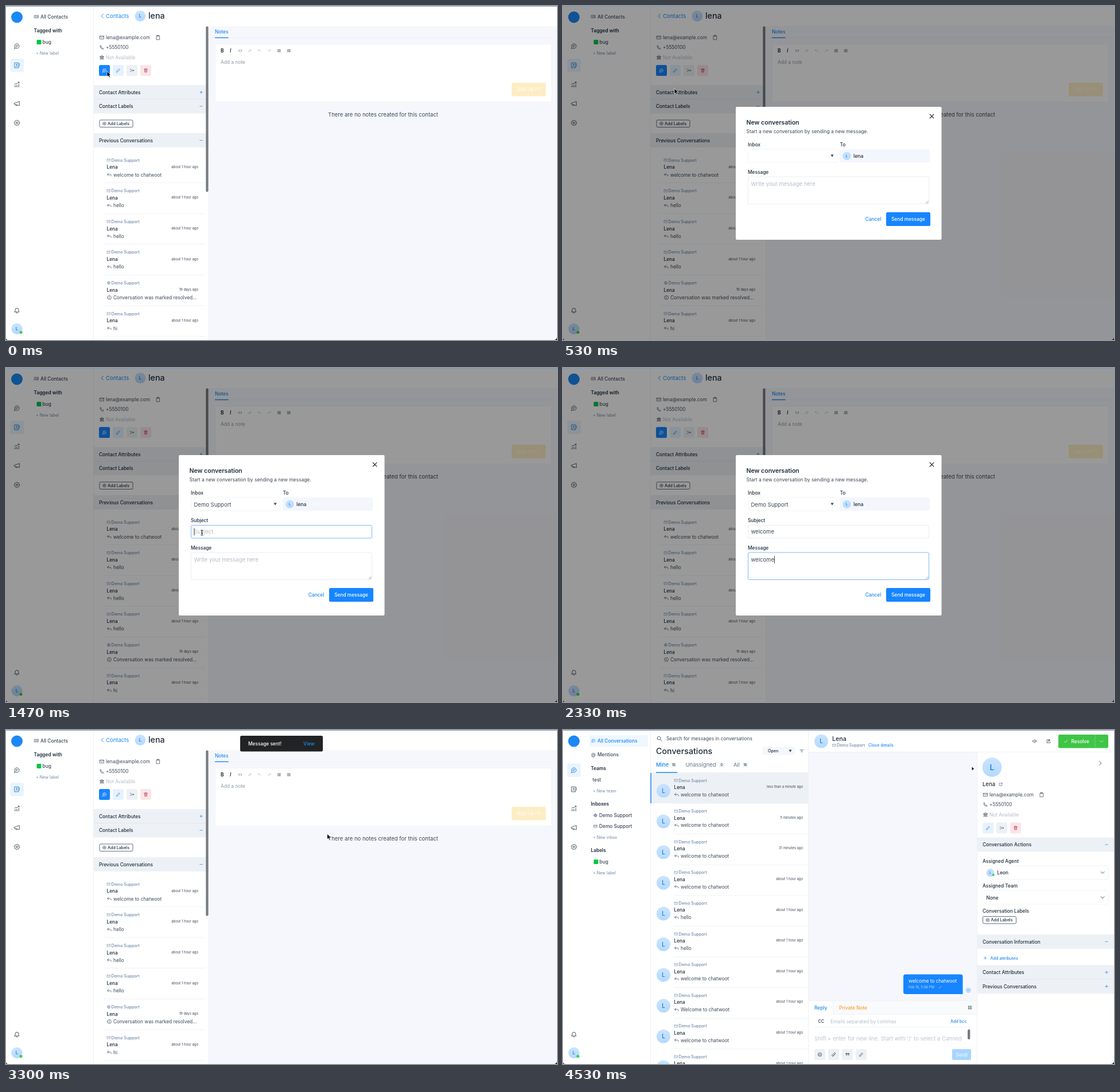
Animation, 960 px wide and 583 px high, one loop 4.86 s. Source, as an HTML page:

```html
<!DOCTYPE html>
<html lang="en">
<head>
<meta charset="utf-8">
<title>New conversation</title>
<style>
html, body { margin: 0; width: 100%; height: 100%; overflow: hidden; background: #fff; }
svg { display: block; width: 100vw; height: 100vh; font-family: Inter, "DejaVu Sans", sans-serif; }
text { white-space: pre; }
</style>
</head>
<body>
<svg id="stage" viewBox="0 0 960 583"></svg>
<script>
const LOOP = 4860;
const BLUE = '#1a88f5', FILL = '#1785ff', DARK = '#1f2d3d', BODY = '#3c4858', MUTED = '#6f88a8', PALE = '#b4bec9';
const PANE = '#f6f7fc', HEAD = '#edf1f5', LINE = '#eef1f5', GREEN = '#06c549';
const XS = 5.94, S = 7.13, M = 8.32, L = 9.5, XL = 14.26;
const NAME = 'Lena', INBOX = 'Demo Support', AGENT = 'Leon', MAIL = 'lena@example.com', PHONE = '+5550100';
const WELCOME = 'welcome to chatwoot';

const ring = r => `M${12 - r} 12a${r} ${r} 0 1 0 ${2 * r} 0a${r} ${r} 0 1 0 ${-2 * r} 0`;
const gear = 'M' + Array.from({ length: 32 }, (_, i) => {
  const a = i * Math.PI / 16, r = i % 4 < 2 ? 10 : 7.6;
  return (12 + r * Math.cos(a)).toFixed(1) + ' ' + (12 + r * Math.sin(a)).toFixed(1);
}).join('L') + 'z';
const icons = {
  chat: 'M3 21l1.5-5a8.5 8.5 0 1 1 3.5 3.5zM8 10h8M8 14h5',
  book: 'M4 3h14v18H4zM21 6v3M21 12v3M7.5 16q3.5-4 7 0M9 9.5a2 2 0 1 0 4 0a2 2 0 1 0-4 0',
  chart: 'M3 12l5-5 4 3 8-7M16 3h4v4M4 17v4M9 14v7M14 16v5M19 11v10',
  horn: 'M3 10l18-6v15L3 14zM7 15.5a3 3 0 0 0 6 2',
  gear: gear + ring(3),
  bell: 'M4 17h16l-2-3v-4a6 6 0 0 0-12 0v4zM10 20.5h4',
  mail: 'M3 5h18v14H3zM3 7l9 6 9-6',
  phone: 'M6 3l3 1 1 4-2 2q2 4 5 6l2-2 4 2v4q-3 2-8-2Q3 12 4 5z',
  bank: 'M3 9l9-6 9 6zM6 9v9M10 9v9M14 9v9M18 9v9M3 20h18',
  clip: 'M5 4h14v18H5zM9 2h6v4H9z',
  pen: 'M4 20l1-5L16 4l4 4L9 19z',
  merge: 'M3 7h4l5 5h9M3 17h4l5-5M17 8l4 4-4 4',
  trash: 'M4 6h16M9 6V3h6v3M6 6l1 15h10l1-15M10 10v7M14 10v7',
  reply: 'M9 5l-6 6 6 6M3 11h12q6 0 6 7',
  info: ring(9) + 'M12 11v6M12 7v1',
  globe: ring(9) + 'M3 12h18M12 3q-8 9 0 18q8-9 0-18',
  addRing: ring(9) + 'M12 8v8M8 12h8',
  plus: 'M12 3v18M3 12h18', minus: 'M3 12h18',
  down: 'M3 8l9 9 9-9', left: 'M16 3l-9 9 9 9', right: 'M8 3l9 9-9 9',
  check: 'M4 13l5 5L20 6', cross: 'M3 3l18 18M21 3L3 21',
  search: 'M3 10a7 7 0 1 0 14 0a7 7 0 1 0-14 0M15 15l7 7',
  card: 'M2 5h20v14H2zM6 10h4M6 14h4M14 10h5M14 14h5',
  code: 'M8 6l-6 6 6 6M16 6l6 6-6 6',
  link: 'M10 14l5-5M9 8l-4 4a3 3 0 0 0 6 6M14 16l5-5a3 3 0 0 0-6-6',
  undo: 'M8 4L3 9l5 5M3 9h11q8 2 4 10', redo: 'M16 4l5 5-5 5M21 9H10q-8 2-4 10',
  list: 'M9 5h13M9 12h13M9 19h13M3 5h2M3 12h2M3 19h2',
  speaker: 'M3 9h4l6-5v16l-6-5H3zM16 9l6 6M22 9l-6 6',
  share: 'M10 5H4v15h16v-5M8 15q1-8 9-8M14 3l6 4-6 5z',
  ext: 'M10 4H4v16h16v-6M14 3h7v7M21 3L11 13',
  smile: ring(9) + 'M8 14q4 4 8 0M9 9v1M15 9v1',
  attach: 'M19 10l-8 9a4 4 0 0 1-6-6l9-9a3 3 0 0 1 5 4l-9 9',
  quote: 'M10 6v6q0 4-4 5M5 6h4v4H5zM20 6v6q0 4-4 5M15 6h4v4h-4z',
  filter: 'M3 6h18M7 12h10M10 18h4',
  expand: 'M8 3v5H3M16 3v5h5M8 21v-5H3M16 21v-5h5M8 8h8v8H8z'
};

// Drawing helpers; text is placed by its vertical middle.
const text = (x, y, s, size = M, fill = BODY, weight = 400, extra = '') =>
  `<text x="${x}" y="${(y + size * .36).toFixed(2)}" font-size="${size}" fill="${fill}" font-weight="${weight}" ${extra}>${s}</text>`;
const mid = 'text-anchor="middle"', end = 'text-anchor="end"';
const rect = (x, y, w, h, fill, r = 0, stroke = 'none') =>
  `<rect x="${x}" y="${y}" width="${w}" height="${h}" fill="${fill}" rx="${r}" stroke="${stroke}" stroke-width=".8"/>`;
const icon = (n, x, y, size = 9, color = BODY, w = 1.9) =>
  `<path transform="translate(${x} ${y}) scale(${size / 24}) translate(-12 -12)" d="${icons[n]}" fill="none" stroke="${color}" stroke-width="${w}" stroke-linejoin="round" stroke-linecap="round"/>`;
const hline = (x, y, w, c = LINE) => rect(x, y, w, 1, c);
const dot = (x, y, r, fill) => `<circle cx="${x}" cy="${y}" r="${r}" fill="${fill}"/>`;
const avatar = (x, y, r) => dot(x, y, r, 'url(#av)') + text(x, y, NAME[0], r * .82, '#1976cc', 500, mid);
const caretDown = (x, y) => `<path d="M${x - 2.6} ${y - 2}h5.2l-2.6 4.2z" fill="${BODY}"/>`;
const group = (id, body) => `<g id="${id}">${body}</g>`;
const square = (x, y, n, bg, color) => rect(x, y, 19, 19, bg, 2.5) + icon(n, x + 9.5, y + 9.5, 8.5, color);
const inboxTag = (x, y, n = 'mail') => icon(n, x + 3.5, y, 7, MUTED) + text(x + 8, y, INBOX, S, MUTED, 500);
const addLabels = (x, y) => rect(x, y, 58, 12.5, '#fff', 2, BODY) + icon('addRing', x + 8.5, y + 6.2, 7.5, DARK, 2) +
  text(x + 14, y + 6.2, 'Add Labels', S, DARK, 500);
const section = (x, y, w, s, sign) => rect(x, y, w, 25, HEAD) + text(x + 9, y + 12.5, s, M, DARK, 500) +
  icon(sign, x + w - 13, y + 12.5, 6, BLUE, 3);
const details = (x, y) => icon('mail', x + 5, y, 9) + text(x + 12, y, MAIL) + icon('clip', x + 103, y, 9) +
  icon('phone', x + 5, y + 17.3, 9) + text(x + 12, y + 17.3, PHONE) +
  icon('bank', x + 5, y + 34.6, 9) + text(x + 12, y + 34.6, 'Not Available', M, PALE);
const tools = (x, y) => square(x, y, 'pen', '#e6f2ff', '#1976cc') + square(x + 24, y, 'merge', HEAD, BODY) +
  square(x + 48, y, 'trash', '#fbe5e8', '#b13b4c');
const menu = (x, y, s, w = 400) => text(x, y, s, M, w > 500 ? DARK : BODY, w);
const addNew = (y, s) => text(52, y, '+ New ' + s, S, MUTED);
const label = y => rect(53.5, y - 4, 8, 8, GREEN, 1.5) + menu(63.5, y, 'bug', 500);

function rail(active) {
  const names = ['chat', 'book', 'chart', 'horn', 'gear'];
  return dot(19, 19.5, 10, BLUE) + rect(7.5, 58.5 + active * 33.5, 23.5, 23.5, '#e9f4ff', 3) +
    names.map((n, i) => icon(n, 19, 70 + i * 33.5, 11.5, i === active ? '#1976cc' : BODY, 1.8)).join('') +
    icon('bell', 19, 531.5, 12) + avatar(19, 563.5, 9.7) + dot(26, 569.5, 2.6, '#44ce4b') + rect(152, 0, 1, 583, LINE);
}

function contacts() {
  const rows = [WELCOME, 'hello', 'hello', 'hello', 'Conversation was marked resolved...', 'hi'];
  const list = rows.map((s, i) => {
    const y = 269 + i * 53.6, old = i === 4;
    return inboxTag(175.5, y, old ? 'globe' : 'mail') + text(175.5, y + 12.3, NAME, M, DARK, 500) +
      text(335, y + 11.7, old ? '19 days ago' : 'about 1 hour ago', XS, BODY, 400, end) +
      icon(old ? 'info' : 'reply', 180, y + 25.5, 9) + text(187, y + 25.5, s) + hline(169, y + 39, 178);
  }).join('');
  const bar = ['code', 'link', 'undo', 'redo', 'list', 'list'].map((n, i) =>
    icon(n, 408 + i * 16.9, 78, 6.5, i % 5 && i < 4 ? PALE : DARK, 2.6)).join('');
  return rect(0, 0, 960, 583, '#fff') + rail(1) +
    icon('card', 53, 18.5, 8) + menu(60, 18.5, 'All Contacts', 500) + menu(48.5, 42.5, 'Tagged with', 600) +
    label(63) + addNew(82, 'label') +
    rect(354, 35, 606, 548, PANE) + rect(353, 35, 1, 548, LINE) + hline(354, 55, 606) +
    icon('left', 168, 17.5, 9, BLUE, 2.6) + text(174, 17.5, 'Contacts', L, BLUE) + avatar(234, 17.5, 9.5) +
    text(248, 17, NAME.toLowerCase(), XL, DARK, 500) + details(162, 55) +
    square(162, 103, 'chat', FILL, '#fff') + tools(186, 103) +
    section(153, 138, 200, 'Contact Attributes', 'plus') + section(153, 162.5, 200, 'Contact Labels', 'minus') +
    hline(153, 162, 200, '#e2e8ef') + addLabels(163, 199) + section(153, 222, 200, 'Previous Conversations', 'minus') + list +
    rect(348.3, 35.5, 4.2, 289, '#777a7e', 2) +
    text(364, 45, 'Notes', M, BLUE, 500) + rect(364, 54.7, 23.5, 1.4, BLUE) +
    rect(364.5, 66.5, 586, 101, '#fff', 1, LINE) + text(374, 78, 'B', M, DARK, 700) +
    text(390, 78, 'I', M, DARK, 600, 'font-style="italic"') + bar +
    text(374, 98.3, 'Add a note', M, '#8f9aa7') + rect(881, 134, 59.5, 23.5, '#fdedc4', 2.5) +
    text(910.5, 146, 'Add (⌘⏎)', M, '#fffaf0', 500, mid) +
    text(657, 189.5, 'There are no notes created for this contact', L, BODY, 400, mid);
}

const spinner = (x, y) => `<g transform="translate(${x} ${y})"><circle r="6" fill="none" stroke="#eef3f9"/>` +
  `<path class="spin" d="M-3.4 5A6 6 0 0 1-4 -4.5" fill="none" stroke="${BLUE}" stroke-width="1.2"/></g>`;
const tab = (x, s, bx, n, on) => text(x, 61, s, L, on ? BLUE : '#64748b', on ? 500 : 400) +
  rect(bx - 5, 56.5, 10, 9, '#f1f4f8', 2.5) + text(bx, 61, n, XS, BODY, 500, mid);
const tabs = (a, b) => tab(162, 'Mine', 193, a, true) + tab(213.5, 'Unassigned', 276.5, 0) + tab(297, 'All', 317.5, b);

function inboxPage() {
  return rect(0, 0, 960, 583, '#fff') + rail(0) + rect(46, 9, 102, 20, '#eff7ff', 3) +
    icon('chat', 53, 18.5, 8, BLUE) + text(60, 18.5, 'All Conversations', M, BLUE, 500) +
    text(53, 42.5, '@', M, BODY, 400, mid) + menu(60, 42.5, 'Mentions', 500) +
    menu(48.5, 66.5, 'Teams', 600) + menu(51.5, 87, 'test', 500) + addNew(106, 'team') +
    menu(48.5, 128.5, 'Inboxes', 600) + icon('globe', 56.5, 149, 7) + menu(63, 149, INBOX, 500) +
    icon('mail', 56.5, 168, 7) + menu(63, 168, INBOX, 500) + addNew(187, 'inbox') +
    menu(48.5, 210, 'Labels', 600) + label(230) + addNew(249.5, 'label') +
    icon('search', 168, 15, 10) + text(180, 15, 'Search for messages in conversations') +
    text(162, 36.8, 'Conversations', XL, DARK, 500) + rect(347.5, 29.5, 57, 14, '#f4f7fb', 3) +
    text(357, 36.5, 'Open', S, DARK, 500) + caretDown(396, 36.5) + hline(153, 74, 274) +
    rect(162, 73.4, 37, 1.5, BLUE) + rect(428, 1, 532, 582, PANE) + rect(427, 0, 1, 583, LINE) +
    group('loading', tabs(0, 0) + spinner(291, 93.5) + text(627, 290, 'Loading Conversations', L) + spinner(747.5, 290.5)) +
    group('loaded', loaded());
}

function loaded() {
  const hour = 'about 1 hour ago', ages = ['less than a minute ago', '5 minutes ago', '31 minutes ago'];
  const rows = Array.from({ length: 10 }, (_, i) => {
    const y = 88 + i * 53.6, s = i === 4 || i === 5 ? 'hello' : i === 7 ? 'Welcome to chatwoot' : WELCOME;
    return (i ? '' : rect(153, 75, 274, 53, HEAD) + rect(152.5, 75, 1.5, 53, BLUE)) +
      avatar(175, y + 18, 12) + inboxTag(193.5, y) + text(193.5, y + 12, NAME, M, DARK, 500) +
      text(418, y + 11, ages[i] || hour, XS, BODY, 400, end) + icon('reply', 198, y + 24.8, 9) +
      text(205, y + 24.8, s) + hline(193, y + 39.5, 234);
  }).join('');
  const field = (y, h) => rect(731, y, 219, h, '#fff', 2, LINE) + icon('down', 940, y + h / 2, 8, DARK, 2.4);
  const composer = rect(428, 472, 293, 111, '#fff') + rect(470, 472.5, 251, 23.5, '#f9fafc') + hline(428, 472, 293) +
    hline(470, 495.5, 251) + rect(470, 473, 1, 23, LINE) + text(438, 484.5, 'Reply', M, BLUE, 500) +
    text(481, 484.5, 'Private Note', M, '#f5a031', 500) + icon('expand', 709, 484.5, 9) +
    text(444.5, 508.5, 'CC', S, DARK, 500) + text(466, 508.5, 'Emails separated by commas', M, PALE) +
    text(675, 508.5, 'Add bcc', S, BLUE, 500) + hline(438, 518, 273) +
    text(438, 538.3, "Shift + enter for new line. Start with '/' to select a Canned", L, '#bcc5cf') +
    rect(705, 522.5, 4.3, 17.5, '#777a7e', 2) +
    ['smile', 'attach', 'quote', 'pen'].map((n, i) => square(438 + i * 24, 557, n, HEAD, DARK)).join('') +
    rect(678, 557, 33, 19, '#a8d5ff', 2.5) + text(694.5, 566.5, 'Send', M, '#e9f5ff', 500, mid);
  const side = rect(722, 39, 238, 544, '#fff') + rect(721, 39, 1, 544, LINE) + avatar(747.5, 65, 16.8) +
    icon('right', 936, 58, 9, BODY, 2.3) + text(731, 94.5, NAME, L, DARK, 500) + icon('ext', 762.5, 95, 7) +
    details(731, 113) + tools(731, 161.5) + section(722, 187.5, 238, 'Conversation Actions', 'minus') +
    text(731, 228.5, 'Assigned Agent', M, DARK, 500) + field(237, 23.5) + avatar(744.5, 249, 7) +
    dot(749.8, 253, 2, '#44ce4b') + text(756.5, 249, AGENT, M, DARK, 500) +
    text(731, 272, 'Assigned Team', M, DARK, 500) + field(280.5, 23.5) + text(737.5, 292.5, 'None', M, DARK, 500) +
    text(731, 315.5, 'Conversation Labels', M, DARK, 500) + addLabels(731.5, 325.5) +
    section(722, 357, 238, 'Conversation Information', 'minus') + icon('plus', 735.5, 398, 6, BLUE, 2.6) +
    text(744.5, 398, 'Add attributes', S, BLUE, 500) + section(722, 410.5, 238, 'Contact Attributes', 'plus') +
    section(722, 435, 238, 'Previous Conversations', 'plus') + hline(722, 434.7, 238, '#e2e8ef');
  return tabs(16, 16) + icon('filter', 416, 36.5, 8) + rows + rect(428, 1, 532, 37.5, '#fff') + hline(428, 38, 532) +
    avatar(450, 19.5, 12) + text(469, 15, NAME, 10.69, DARK, 500) + inboxTag(469, 26.7) +
    text(532, 26.7, 'Close details', S, BLUE, 500) + icon('speaker', 822, 19.5, 9) + icon('share', 846, 19.5, 9) +
    rect(863, 8, 87, 23.5, '#3fc546', 2.5) + icon('check', 876, 19.7, 8, '#fff', 2.2) +
    text(885.5, 19.7, 'Resolve', M, '#fff', 500) + rect(926.5, 8, .8, 23.5, '#7ad97f') + icon('down', 938.5, 19.7, 7, '#fff', 2.2) +
    '<path d="M712.5 64.5v6l3.5-3z" fill="#111"/>' +
    `<path d="M597 426.5h95.500a4 4 0 0 1 4 4v30.500h-99.500a4 4 0 0 1-4-4v-26.500a4 4 0 0 1 4-4z" fill="${FILL}"/>` +
    text(602, 437.5, WELCOME, M, '#fff') + text(602, 449, 'Feb 16, 5:06 PM', XS, '#b5dbff') +
    icon('check', 657, 449, 7, '#b5dbff', 2.2) + avatar(706.3, 454, 4.8) + composer + side;
}

function modal() {
  const caption = (x, y, s) => text(x, y, s, M, DARK, 500);
  const box = (id, y, h) => `<rect id="${id}" x="322.5" y="${y}" width="315" height="${h}" rx="2" fill="#fff" stroke-width=".9"/>`;
  const entry = (id, y) => `<text id="${id}" x="327.5" y="${y}" font-size="${L}"></text>`;
  return rect(0, 0, 960, 583, 'rgba(0,0,0,.4)') +
    group('panel', '<rect id="sheet" x="301" width="358.5" fill="#fff" rx="2"/>' +
      icon('cross', 642.5, 16.5, 9, '#111', 2.8) + text(319.5, 26.7, 'New conversation', 10.55, DARK, 600) +
      text(319.5, 43.2, 'Start a new conversation by sending a new message.', 8.45) +
      caption(322, 66.3, 'Inbox') + rect(322.5, 74, 155, 23, '#fff', 2, '#eef1f5') + caretDown(469, 85.5) +
      group('inbox', text(327.5, 86.3, INBOX, L)) +
      caption(482.5, 66.3, 'To') + rect(482.5, 74, 156.5, 23, '#f4f6fd', 2) + avatar(494.5, 85.7, 7.2) +
      text(506, 85.7, NAME.toLowerCase(), 8.7, DARK, 500) +
      group('subject', caption(322, 114.3, 'Subject') + box('subjectBox', 122.5, 22.5) + entry('subjectText', 137.2)) +
      group('lower', caption(322, 114.3, 'Message') + box('messageBox', 122, 47.5) + entry('messageText', 138) +
        '<path id="typo" d="M382.5 140.7h41.5" stroke="#e5484d" stroke-width="1.3" stroke-dasharray="1.3 1.1"/>' +
        '<path d="M632 168.5l4.5-4.5M634.5 168.5l2-2" stroke="#777" stroke-width=".7"/>' +
        text(540.5, 196, 'Cancel', M, BLUE, 500, mid) + rect(563, 184, 77, 24, FILL, 2.5) +
        text(601.5, 196, 'Send message', M, '#fff', 500, mid)) +
      '<rect id="caret" width=".9" height="13" fill="#222"/>');
}

const cursors =
  group('arrow', '<path d="M0 0v9.5l2.2-2 1.5 3.3 1.7-.8-1.5-3.2h3z" fill="#000" stroke="#fff" stroke-width=".7"/>') +
  group('beam', '<path d="M-2-4.5q2 0 2 1.5v6q0 1.5-2 1.5M2-4.5q-2 0-2 1.5M0 3q0 1.5 2 1.5M-1 1h2" fill="none" stroke="#111" stroke-width="1"/>') +
  group('hand', '<path d="M-1.5-4.5q1-1 1.7 0v3l3.3.7q1 .3.8 1.5l-.7 3.3h-4.3l-3-3.6q.3-1.3 1.7-.3l.5.5z" fill="#fff" stroke="#111" stroke-width=".9" stroke-linejoin="round"/>');

const svg = document.getElementById('stage');
svg.innerHTML = '<defs><linearGradient id="av" x2="0" y2="1"><stop stop-color="#c9e4ff"/><stop offset="1" stop-color="#b4d9ff"/></linearGradient></defs>' +
  group('contacts', contacts()) + group('conversations', inboxPage()) + group('modal', modal()) +
  group('toast', rect(408, 10, 144, 27.5, '#222324', 2.5) + text(422, 23.7, 'Message sent!', M, '#fff', 500) + text(518, 23.7, 'View', M, BLUE, 500)) +
  group('status', '<path d="M0 570.5h316.5q3 0 3 3v9.5H0z" fill="#15294d"/>' +
    text(3, 577, 'localhost:3000/app/accounts/1/conversations/24', 6.7, '#fff', 600)) +
  '<path d="M0 579v4h4a4 4 0 0 1-4-4M960 578v5h-5a5 5 0 0 0 5-5" fill="#15181d"/>' +
  rect(0, 0, 960, 1, '#7796c2') + group('pointer', cursors);

const el = {};
svg.querySelectorAll('[id]').forEach(n => el[n.id] = n);
const spins = svg.querySelectorAll('.spin');

const show = (id, on) => el[id].setAttribute('display', on ? 'inline' : 'none');
const ramp = (t, a, b) => Math.min(1, Math.max(0, (t - a) / (b - a)));
const ease = k => k * k * (3 - 2 * k);
const within = (t, a, b) => t >= a && t < b;

// When things happen, in ms
const PICK = 1040, SUBJECT = 1420, MESSAGE = 2060, SEND = 3050, SENT = 3185, VIEW = 3690, READY = 3850, TOAST_END = 3940;

// Pointer stops: time, x, y
const stops = [[0, 176, 114], [190, 176, 114], [430, 194, 144], [580, 194, 144], [800, 420, 262], [1100, 420, 262],
  [1360, 341.5, 287.5], [1870, 341.5, 287.5], [2040, 352, 336], [2720, 352, 336], [2980, 605, 393],
  [3140, 605, 393], [3430, 527, 29.5], [TOAST_END, 527, 29.5], [4240, 560, 595]];

function pointer(t) {
  let i = 0;
  while (i < stops.length - 2 && t >= stops[i + 1][0]) i++;
  const [a, x, y] = stops[i], [b, u, v] = stops[i + 1], k = ease(ramp(t, a, b));
  el.pointer.setAttribute('transform', `translate(${x + (u - x) * k} ${y + (v - y) * k})`);
  const hand = within(t, 2940, 3190) || within(t, 3400, TOAST_END);
  const beam = within(t, 1320, 2790);
  const typing = within(t, 1530, 1870) || within(t, 2130, 2720);
  show('hand', hand);
  show('beam', beam && !typing);
  show('arrow', !hand && !beam);
}

function type(id, s, hint, k) {
  const typed = s.slice(0, Math.round(s.length * k));
  el[id].textContent = typed || hint;
  el[id].setAttribute('fill', typed ? BODY : PALE);
  return typed;
}

function draw(t) {
  const opened = t >= VIEW, chosen = t >= PICK, ready = t >= READY;
  show('contacts', !opened);
  show('conversations', opened);
  show('loading', !ready);
  show('loaded', ready);
  spins.forEach(n => n.setAttribute('transform', `rotate(${(t - 3730) * .9})`));

  const alpha = ramp(t, 441, 529) * (1 - ramp(t, SENT, SENT + 50));
  show('modal', alpha > 0);
  el.modal.setAttribute('opacity', alpha);
  el.panel.setAttribute('transform', `translate(0 ${chosen ? 152 : 176})`);
  el.sheet.setAttribute('height', chosen ? 280 : 232);
  el.lower.setAttribute('transform', `translate(0 ${chosen ? 48 : 0})`);
  show('inbox', chosen);
  show('subject', chosen);

  const subject = type('subjectText', 'welcome', 'Subject', ramp(t, 1530, 1850));
  const message = type('messageText', WELCOME, 'Write your message here', ramp(t, 2130, 2690));
  show('typo', message === WELCOME);
  const onSubject = within(t, SUBJECT, MESSAGE), onMessage = within(t, MESSAGE, SEND);
  el.subjectBox.setAttribute('stroke', onSubject ? '#6fb1f7' : '#e6ebf0');
  el.messageBox.setAttribute('stroke', onMessage ? '#6fb1f7' : '#e6ebf0');
  show('caret', onSubject || onMessage);
  if (onSubject || onMessage) {
    const word = onSubject ? subject : message, node = onSubject ? el.subjectText : el.messageText;
    el.caret.setAttribute('x', 327.5 + (word ? node.getComputedTextLength() : 0));
    el.caret.setAttribute('y', onSubject ? 127.3 : 176);
  }

  show('toast', within(t, SENT + 30, TOAST_END));
  show('status', within(t, 3450, TOAST_END + 60));
  pointer(t);
}

const start = performance.now();
function frame() {
  draw((performance.now() - start) % LOOP);
  requestAnimationFrame(frame);
}
draw(0);
requestAnimationFrame(frame);
</script>
</body>
</html>
```
